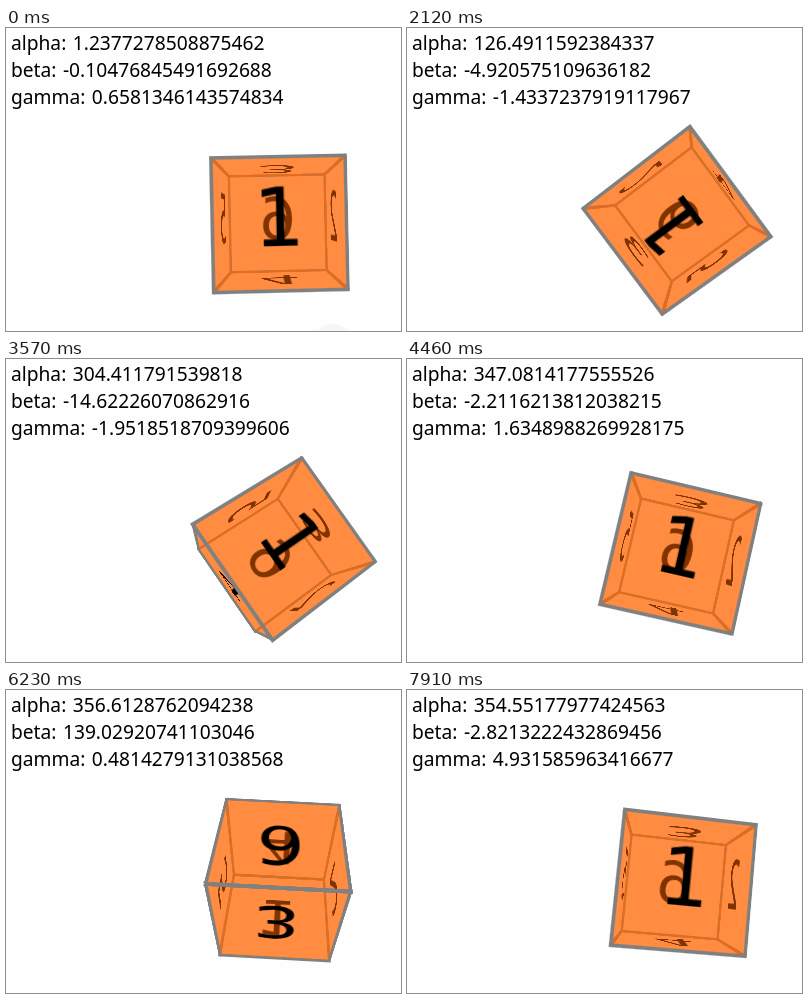
An HTML page that plays this animation: 395x303 px, repeating every 7990 ms.

```html
<!DOCTYPE html>
<html lang="en">
<head>
<meta charset="utf-8">
<title>Device orientation die</title>
<style>
  html, body { margin: 0; width: 100%; height: 100%; overflow: hidden; background: #fefefe; }
  #stage { position: relative; width: 100%; height: 100%; overflow: hidden; }
  #readout {
    position: absolute; left: 5px; top: 1px; white-space: pre; color: #000;
    font: 300 19.2px/27px "Noto Sans", "Open Sans", sans-serif; word-spacing: 1.5px;
  }
  #glow {
    position: absolute; left: 307px; top: 296px; width: 40px; height: 40px;
    border-radius: 50%; background: #f6f6f6;
  }
  #scene { position: absolute; left: 271px; top: 193.4px; width: 0; height: 0; perspective: 330px; perspective-origin: 0 0; }
  #cube { position: absolute; width: 0; height: 0; transform-origin: 0 0; transform-style: preserve-3d; }
  .face {
    position: absolute; left: -56.5px; top: -54.9px; width: 115px; height: 115px;
    box-sizing: border-box; border: 3px solid #808080; background: rgba(255, 102, 0, .5);
    color: #000; text-align: center; font: 67px/101px "DejaVu Sans", sans-serif;
  }
</style>
</head>
<body>
<div id="stage">
  <div id="readout"></div>
  <div id="glow"></div>
  <div id="scene"><div id="cube"></div></div>
</div>
<script>
const LOOP = 7990, STEP = 74;
const $ = id => document.getElementById(id);
const readout = $('readout'), glow = $('glow'), cube = $('cube');

const faces = {
  1: 'rotateY(0deg)', 6: 'rotateY(180deg)',
  5: 'rotateY(-90deg)', 2: 'rotateY(90deg)',
  3: 'rotateX(90deg)', 4: 'rotateX(-90deg)'
};
for (const [digit, turn] of Object.entries(faces)) {
  const face = document.createElement('div');
  face.className = 'face';
  face.textContent = digit;
  face.style.transform = `${turn} translateZ(55px)`;
  cube.append(face);
}

// Key poses; hold is how long the sensor stays silent
const poses = [
  { at: 0, angles: [1.2377278508875462, -0.10476845491692688, 0.6581346143574834], hold: 200 },
  { at: 1170, angles: [24.837089768273753, 1.9799082730356126, 3.3774102518033424] },
  { at: 2120, angles: [126.4911592384337, -4.920575109636182, -1.4337237919117967] },
  { at: 3570, angles: [304.411791539818, -14.62226070862916, -1.9518518709399606] },
  { at: 4310, angles: [346, -6, 1] },
  { at: 5430, angles: [351.0404893159069, 53.452969146534585, 5.20051001217061], hold: 230 },
  { at: 6230, angles: [356.6128762094238, 139.02920741103046, 0.4814279131038568] },
  { at: 6440, angles: [356.5, -179, 1] },
  { at: 7910, angles: [354.55177977424563, -2.8213222432869456, 4.931585963416677] }
];
const last = poses.length - 1;
const wrap = v => v > 180 ? v - 360 : v;

// Monotone cubic through one angle of all poses
function track(axis) {
  const v = poses.map(p => p.angles[axis]);
  for (let i = 1; i <= last; i++) if (v[i] < v[i - 1] - 180) v[i] += 360;
  const slope = i => (v[i + 1] - v[i]) / (poses[i + 1].at - poses[i].at);
  const tangent = v.map((_, i) => {
    if (i === 0) return 0;
    if (i === last) return slope(i - 1);
    const a = slope(i - 1), b = slope(i);
    return a * b > 0 ? 2 * a * b / (a + b) : 0;
  });
  return (i, s) => {
    const r = 1 - s, span = poses[i + 1].at - poses[i].at;
    return v[i] + (v[i + 1] - v[i]) * s * s * (3 - 2 * s)
      + span * s * r * (r * tangent[i] - s * tangent[i + 1]);
  };
}
const [alpha, beta, gamma] = [0, 1, 2].map(track);

// Angles of the latest sensor update
function anglesAt(time) {
  const i = poses.findLastIndex(p => p.at <= time);
  const { at, angles, hold = STEP } = poses[i];
  if (i === last || time < at + hold) return angles;
  const end = poses[i + 1].at, rest = end - at - hold;
  const step = rest / Math.max(1, Math.round(rest / STEP));
  const sample = at + hold + Math.floor((time - at - hold) / step) * step;
  const s = (sample - at) / (end - at);
  return [alpha(i, s), wrap(beta(i, s)), gamma(i, s)];
}

function draw(time) {
  const [a, b, g] = anglesAt(time);
  readout.textContent = `alpha: ${a}\nbeta: ${b}\ngamma: ${g}`;
  cube.style.transform = `rotateZ(${-a}deg) rotateX(${-b}deg) rotateY(${g}deg)`;
  glow.style.opacity = Math.min(1, Math.max(0, (340 - time) / 140));
}

const start = performance.now();
function frame() {
  draw((performance.now() - start) % LOOP);
  requestAnimationFrame(frame);
}
draw(0);
requestAnimationFrame(frame);
</script>
</body>
</html>
```
